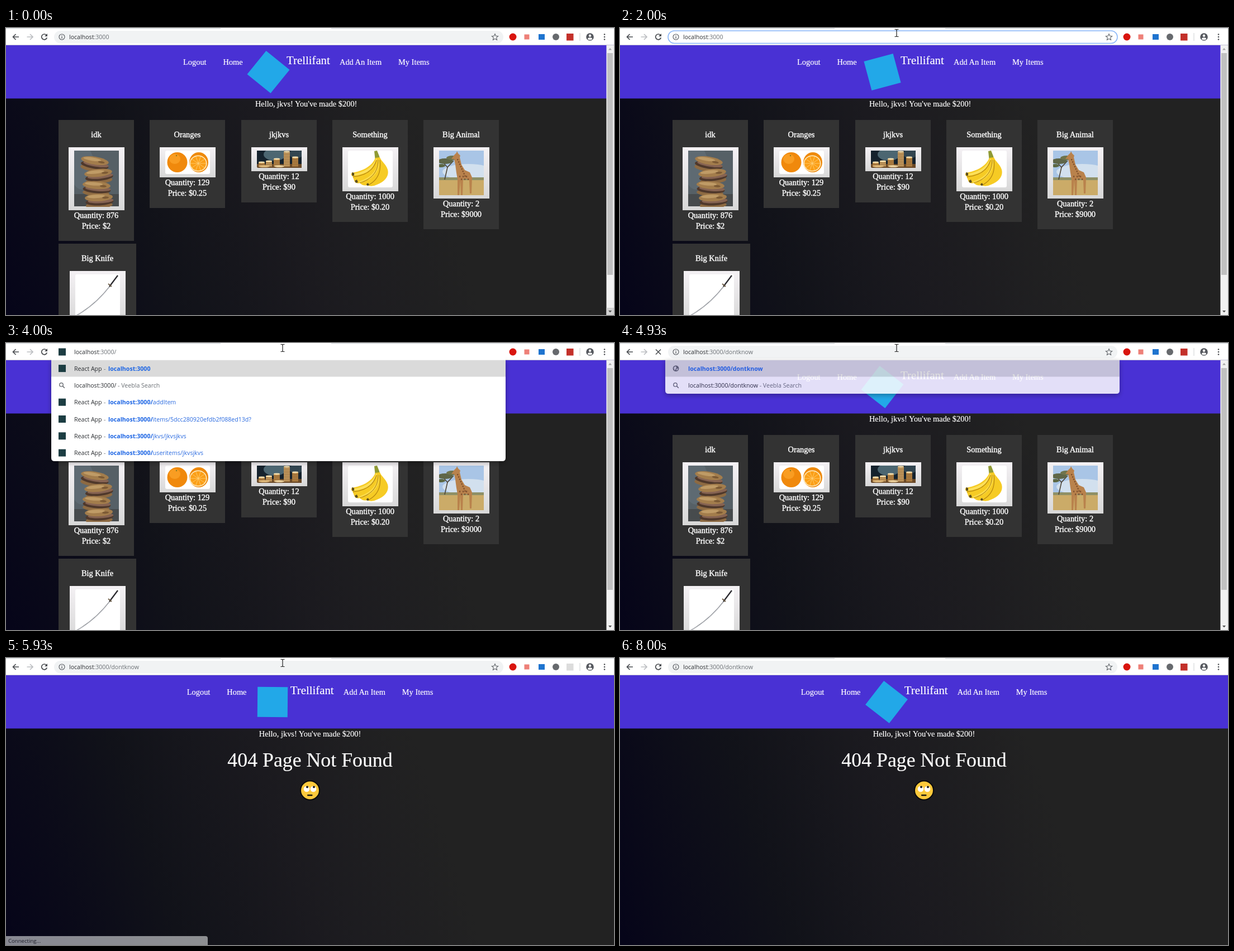
These frames come from a looping animation (1088x515 px, 8070 ms). An HTML page:

```html
<!DOCTYPE html>
<html lang="en">
<head>
<meta charset="utf-8">
<title>Item shop</title>
<style>
html, body { margin: 0; width: 100%; height: 100%; overflow: hidden; background: #fff; }
svg { display: block; width: 1088px; height: 515px; }
text { white-space: pre; }
.page text { font-family: "Liberation Serif", Times, serif; font-size: 14.4px; fill: #fff; stroke: #fff; stroke-width: .18px; }
.page .card text { stroke-width: .4px; }
.ui text, text.ui { font-family: "Open Sans", "Noto Sans", sans-serif; font-size: 10.6px; fill: #2b2e32; }
.ui .grey { fill: #6b7075; }
.ui .link { fill: #2b6be0; }
.ui .bold { fill: #1a64e4; font-weight: 700; }
.mid { text-anchor: middle; }
</style>
</head>
<body>
<svg id="stage" viewBox="0 0 1088 515" xmlns="http://www.w3.org/2000/svg"></svg>
<script>
const LOOP = 8070;
const stage = document.getElementById('stage');
const BRAND = 'Trellifant', USER = 'jkvs', ENGINE = 'Veebla';

const rect = (x, y, w, h, fill, more = '') =>
  `<rect x="${x}" y="${y}" width="${w}" height="${h}" fill="${fill}" ${more}/>`;
const disc = (x, y, r, fill, more = '') =>
  `<circle cx="${x}" cy="${y}" r="${r}" fill="${fill}" ${more}/>`;
const oval = (x, y, rx, ry, fill, more = '') =>
  `<ellipse cx="${x}" cy="${y}" rx="${rx}" ry="${ry}" fill="${fill}" ${more}/>`;
const path = (d, fill, more = '') => `<path d="${d}" fill="${fill}" ${more}/>`;
const line = (d, color, w = 1, more = '') =>
  path(d, 'none', `stroke="${color}" stroke-width="${w}" ${more}`);
const text = (x, y, s, more = '') => `<text x="${x}" y="${y}" ${more}>${s}</text>`;
const span = (s, cls) => `<tspan class="${cls}">${s}</tspan>`;
const group = (id, body, more = '') => `<g id="${id}" ${more}>${body}</g>`;
const repeat = (n, f) => Array.from({ length: n }, (_, i) => f(i)).join('');

// Pictures, each drawn from its own top left corner
function cookies() {
  return rect(0, 0, 80, 100, '#566066') + rect(0, 78, 80, 22, '#474b4d') +
    oval(14, 30, 22, 40, '#65727b', 'opacity=".6"') +
    repeat(4, i => {
      const x = 40 + [-3, 3, 0, 4][i], y = 18 + i * 22, tilt = [9, -6, 4, -3][i];
      return `<g transform="translate(${x} ${y}) rotate(${tilt})">` +
        oval(0, 14, 24, 6, '#8d6a42') + oval(1, 8, 25, 6.5, '#4f382b') +
        oval(3, 6, 23, 4.5, '#866352') + oval(0, 0, 25, 7, '#a37d4c') +
        oval(-5, -2, 16, 3, '#bf9b66') + oval(12, 1, 6, 2, '#7c5a35') + '</g>';
    });
}
function oranges() {
  return rect(0, 0, 80, 42, '#fff') + disc(21.5, 21, 18, '#f0890c') +
    oval(17, 15, 10, 9, '#f99d22') + disc(20, 9, 1.2, '#8a7a1c') +
    oval(60, 21, 17, 18, '#ee8a0d') + oval(59, 23, 15.5, 14.5, '#fff0c8') +
    oval(59, 23, 14, 13, '#fb9f17') +
    repeat(5, i => {
      const a = i * Math.PI / 5, x = 14 * Math.cos(a), y = 13 * Math.sin(a);
      return line(`M${59 - x} ${23 - y}L${59 + x} ${23 + y}`, '#ffd27c', .8);
    });
}
function coins() {
  return rect(0, 0, 80, 31, '#15222d') + oval(32, 7, 20, 11, '#5f7d88', 'opacity=".75"') +
    oval(70, 6, 12, 8, '#3f5560', 'opacity=".7"') + rect(0, 24, 80, 7, '#6b4a28') +
    [[3, 8], [16, 10], [30, 14], [48, 27], [63, 17]].map(([x, h], i) =>
      rect(x, 29 - h, 11, h, i % 2 ? '#d0a566' : '#b98746') +
      repeat(h / 3 | 0, k => line(`M${x} ${28 - k * 3}h11`, '#6d4926', .8)) +
      oval(x + 5.5, 29 - h, 5.5, 1.4, '#f5e0b0')).join('') +
    oval(13, 28, 10, 2, '#dcb678') + oval(40, 28, 9, 2, '#e8cc98');
}
function bananas() {
  return rect(0, 0, 80, 66, '#fff') +
    path('M47 1l5-1 4 10 2 8-9 2z', '#8f9a34') +
    path('M49 13C44 26 30 36 7 40q-3 3 1 6l4 10q4 4 9 2 6 6 13 4 8 4 18-1C67 55 74 45 71 34 68 24 60 20 57 12z', '#f6cb24') +
    path('M50 14C46 28 32 38 9 42l1 3C34 43 48 32 52 16z', '#fde05a') +
    path('M53 18C53 36 40 49 18 56l4 2C44 53 57 38 56 17z', '#fbdc4c') +
    line('M51 17C46 34 32 45 9 47M54 17C54 38 42 52 21 58M57 17C60 40 52 54 36 62', '#b98a10', 1.3) +
    path('M7 39l4 1v5l-4 0zM12 54l4-2 2 5-4 1zM33 60l3-2 2 4-4 1z', '#5f5020');
}
function giraffe() {
  return rect(0, 0, 80, 80, '#a9c5e6') + oval(52, 38, 46, 14, '#d2e0ee') +
    rect(0, 52, 80, 28, '#cbab68') + rect(0, 48, 80, 5, '#8f9066') +
    line('M10 52L15 30L26 18M15 30L6 20', '#4d4436', 1.6) +
    oval(11, 19, 14, 5, '#5f6648') + oval(24, 13, 11, 4, '#6f744d') + oval(4, 27, 7, 3, '#5c6743') +
    path('M27 8l4-4 1-3 2 4 4 4-1 3 3 13 6 10 9 4 4 9-1 29h-3l-1-24-7-3-4 1-1 29h-3l-1-27-2 27h-3l0-29-2-11-2-15-2-10-5 0z', '#b9824c') +
    repeat(8, i => rect(32 + i * 1.9, 15 + i * 4.2, 2.4, 2.4, '#80502c')) +
    repeat(6, i => rect(36 + i * 3, 45 + i % 2 * 5, 2.2, 3, '#845532'));
}
function knife() {
  return rect(0, 0, 80, 80, '#fff') +
    line('M2 74Q36 55 63 20', '#8f9298', 1.6) + line('M3 74Q36 56 63 21', '#d8dade', .8) +
    line('M61 22L76 2', '#2c2b30', 2.4) + line('M59 17L65 22', '#6b5b45', 2);
}

function card(x, y, w, h, title, art, ih, qty, price) {
  const c = x + w / 2, fx = Math.round(c - 50), fy = y + 49;
  return rect(x, y, w, h, '#333') +
    '<g class="card">' + text(c, y + 31, title, 'class="mid"') +
    text(c, fy + ih + 26, 'Quantity: ' + qty, 'class="mid"') +
    text(c, fy + ih + 45, 'Price: $' + price, 'class="mid"') + '</g>' +
    rect(fx, fy, 100, ih + 12, 'url(#mat)') +
    `<svg x="${fx + 10}" y="${fy + 6}" width="80" height="${ih}"><g clip-path="inset(0 round 3px)">${art}</g></svg>`;
}

// Header shared by both pages; dx is the shift without a scrollbar
function header(dx, id) {
  return rect(0, 31, 1088, 95.5, '#4931d4') + group(id, rect(-27, -27, 54, 54, '#22a8e8')) +
    text(317 + dx, 66, 'Logout') + text(388.5 + dx, 66, 'Home') +
    text(502 + dx, 65, BRAND, 'style="font-size:20.8px"') +
    text(597 + dx, 66, 'Add An Item') + text(702 + dx, 66, 'My Items') +
    text(537.2 + dx, 141, `Hello, ${USER}! You've made $200!`, 'class="mid"');
}

const shop = rect(0, 126, 1088, 389, 'url(#dusk)') + header(0, 'spinA') +
  card(94, 165, 135, 217, 'idk', cookies(), 101, 876, '2') +
  card(257, 165, 135, 158, 'Oranges', oranges(), 42, 129, '0.25') +
  card(421, 165, 135, 148, 'jk' + USER, coins(), 31, 12, '90') +
  card(584, 165, 135, 183, 'Something', bananas(), 67, 1000, '0.20') +
  card(747, 165, 135, 196, 'Big Animal', giraffe(), 80, 2, '9000') +
  card(94, 387, 139, 217, 'Big Knife', knife(), 80, 1, '40') +
  rect(1074.4, 31, 13.6, 484, '#f1f1f1') + rect(1076, 45, 10, 398, '#c1c1c1') +
  group('press', rect(1074.4, 502, 13.6, 13, '#d2d2d2')) +
  path('M1078 39.5l3-3.5 3 3.5z', '#a3a3a3') + path('M1078 507l3 3.5 3-3.5z', '#505050');

const face = disc(544, 237.5, 17, '#fdc93b', 'stroke="#0a0a0a" stroke-width="2"') +
  disc(538, 235, 5.3, '#fff') + disc(550, 235, 5.3, '#fff') +
  disc(539, 231.5, 2, '#1a1a1a') + disc(551, 231.5, 2, '#1a1a1a') +
  rect(539, 245, 9.5, 2.4, '#1d1a12', 'rx="1"');

const missing = rect(0, 126, 1088, 389, 'url(#dusk)') + header(6.8, 'spinB') +
  text(544, 195, '404 Page Not Found', 'class="mid" style="font-size:35.8px"') + face;

const glass = (x, y) => disc(x - 1, y - 1, 3.2, 'none', 'stroke="#5f6368" stroke-width="1.3"') +
  line(`M${x + 1.4} ${y + 1.4}l3.4 3.4`, '#5f6368', 1.5);
const globe = (x, y) => disc(x, y, 5.4, '#5f6368') +
  path(`M${x - 4} ${y - 1}l3-3 2 2-1 3-2 3zM${x + 1} ${y + 1}l3-1-1 3-2 1z`, '#cfcfd4');
const tile = y => rect(94, y - 6.5, 13, 13, '#1c3c42');

const rowY = i => 45.6 + i * 30.3;
const visit = (i, tail) => tile(rowY(i)) + text(122, rowY(i) + 4, 'React App') + text(175, rowY(i) + 4, '-', 'class="grey"') +
  text(183, rowY(i) + 4, span('localhost:3000' + (tail ? '/' : ''), 'bold') + span(tail, 'link'));
const search = id => glass(100, rowY(1)) +
  text(122, rowY(1) + 4, `<tspan id="${id}">localhost:3000/</tspan>` + span(` - ${ENGINE} Search`, 'grey'));

const panel = h => path(`M81 30V${h - 6}q0 6 6 6H888q6 0 6-6V30z`, '#fff') +
  rect(81, 30.5, 813, 30, '#dadada');

const longList = panel(212) + visit(0, '') + search('find') + visit(2, 'addItem') +
  visit(3, 'items/5dcc280920efdb2f088ed13d?') +
  visit(4, `${USER}/${USER}${USER}`) + visit(5, `useritems/${USER}${USER}`);
const shortList = panel(91) + globe(100, rowY(0)) +
  text(122, rowY(0) + 4, '', 'id="go" class="bold"') + search('findShort');

const toolbar = rect(0, 0, 1088, 30, '#fff') + rect(0, 0, 384, 1.5, '#dee1e6') +
  rect(582, 0, 506, 1.5, '#dee1e6') + rect(0, 30, 1088, 1, '#c4c1d6') +
  line('M23 16H12.5M17.5 11l-5 5 5 5', '#4a4d51', 1.7) +
  line('M37.5 16H48M43 11l5 5-5 5', '#bcbec1', 1.7) +
  group('reload', line('M72.2 12.6A4.9 4.9 0 1 0 73.3 17.2', '#4a4d51', 1.7) + path('M74 10v5h-5z', '#4a4d51')) +
  group('stop', line('M64 11.5l9 9M73 11.5l-9 9', '#4a4d51', 1.6)) +
  group('pill', rect(86, 5, 804, 22.5, '#f1f3f4', 'id="box" rx="11.25" stroke-width="1.5"') +
    disc(100, 16, 5, 'none', 'stroke="#5f6368" stroke-width="1.2"') +
    rect(99.4, 15, 1.3, 4, '#5f6368') + rect(99.4, 12.7, 1.3, 1.4, '#5f6368') +
    line('M875 10.6l1.6 3.7 4 .4-3 2.7.9 4-3.5-2.1-3.5 2.1.9-4-3-2.7 4-.4z', '#5f6368', 1.1)) +
  disc(907, 16, 6.5, '#d9150f') + rect(927.5, 11.5, 9, 9, '#ee8078') +
  rect(953, 11, 11, 10, '#1f74cf') + disc(984, 16, 6, '#66696d') +
  rect(1003, 10, 12.5, 12.5, '#c3302a', 'id="ext"') + rect(1026.5, 9, 1, 14, '#cfd1d4') +
  disc(1045, 16, 6.8, '#55585e') + disc(1045, 13.7, 2.2, '#fff') + oval(1045, 19.3, 3.9, 2, '#fff') +
  repeat(3, i => disc(1071, 11.5 + i * 4.5, 1.3, '#4a4d51'));

stage.innerHTML = `<defs>
  <linearGradient id="dusk" gradientUnits="userSpaceOnUse" x1="0" y1="480" x2="760" y2="230">
    <stop offset="0" stop-color="#060519"/><stop offset=".36" stop-color="#111219"/>
    <stop offset=".65" stop-color="#1b1a1f"/><stop offset="1" stop-color="#222"/></linearGradient>
  <linearGradient id="mat" x1="0" y1="0" x2="0" y2="1">
    <stop offset="0" stop-color="#f4f1f4"/><stop offset="1" stop-color="#d8d8d8"/></linearGradient>
  <filter id="shade" x="-5%" y="-20%" width="110%" height="150%">
    <feDropShadow dx="0" dy="3" stdDeviation="4" flood-opacity=".35"/></filter></defs>` +
  group('shop', shop, 'class="page"') + group('missing', missing, 'class="page"') +
  group('status', path('M0 499H357q4 0 4 4V515H0z', '#dfe1e3') +
    text(4, 511, 'Connecting...', 'style="font-size:9.6px"'), 'class="ui"') +
  group('bar', toolbar, 'class="ui"') +
  group('drop', group('long', longList) + group('short', shortList), 'class="ui" filter="url(#shade)"') +
  group('edit', path('M81 30.5V8q0-6 6-6H888q6 0 6 6V30.5z', '#fff') + tile(16)) +
  text(113, 20, '<tspan>localhost</tspan><tspan id="tail" class="grey"></tspan>', 'id="url" class="ui"') +
  rect(0, 7, 1, 15, '#222', 'id="caret"') +
  group('arrow', path('M0 0V13l3-2.8 2.2 5 2.3-1-2.2-4.9H9.5z', '#fff', 'stroke="#111" stroke-width=".9"')) +
  group('beam', line('M-3.5 -6.5h2.5l1 1 1-1h2.5M-3.5 6.5h2.5l1-1 1 1h2.5M0 -5.5V5.5', '#222', 1.2));

const el = {};
stage.querySelectorAll('[id]').forEach(n => el[n.id] = n);

const show = (n, on) => n.setAttribute('display', on ? 'inline' : 'none');
const place = (n, x, y, a = 0) => n.setAttribute('transform', `translate(${x} ${y}) rotate(${a})`);
const clamp = v => Math.max(0, Math.min(1, v));

const route = [[70, 1083, 512], [470, 770, 250], [870, 520, 38], [970, 495, 9], [5990, 495, 9],
  [6500, 420, 250], [6870, 348, 470], [7080, 285, 500], [7330, 193, 516]];
function pointer(t) {
  const i = route.findIndex(p => p[0] > t);
  if (i < 1) return null;
  const [t0, x0, y0] = route[i - 1], [t1, x1, y1] = route[i];
  const k = (t - t0) / (t1 - t0);
  return [x0 + (x1 - x0) * k, y0 + (y1 - y0) * k];
}

const WORD = 'dontknow';
const OPEN = 2400, TYPE = 4070, ENTER = 4870, LOADED = 5400;

function draw(t) {
  const loaded = t >= LOADED, open = t >= OPEN && t < ENTER;
  show(el.shop, !loaded);
  show(el.missing, loaded);
  place(el.spinA, 469.5, 79, t * .018 - 51);
  place(el.spinB, 477, 79, 270.5 + (t - 5930) * .018);
  show(el.press, t < 140);

  const busy = t >= ENTER && t < 5870;
  show(el.stop, busy);
  show(el.reload, !busy);
  el.ext.setAttribute('fill', loaded && t < 6300 ? '#dcdcdc' : '#c3302a');

  const focus = t >= 1270 && t < OPEN;
  el.box.setAttribute('fill', focus ? '#fff' : '#f1f3f4');
  el.box.setAttribute('stroke', focus ? '#86b4f8' : 'none');
  show(el.pill, !open);
  show(el.edit, open);

  const n = t < TYPE ? 0 : Math.min(8, 1 + Math.floor((t - TYPE) / 85));
  const tail = ':3000' + (t < OPEN ? '' : '/' + WORD.slice(0, n));
  el.tail.textContent = tail;
  el.url.setAttribute('x', open ? 122 : 113);
  el.go.textContent = el.findShort.textContent = 'localhost' + tail;

  const fade = t < ENTER ? 1 : clamp(1 - (t - 4890) / 260);
  show(el.drop, t >= OPEN && fade > 0);
  el.drop.setAttribute('opacity', fade);
  show(el.long, n === 0);
  show(el.short, n > 0);

  const blink = t < 2930 || t >= 3470 && t < 4000 || t >= TYPE;
  show(el.caret, open && blink);
  if (open) el.caret.setAttribute('x', Math.round(122 + el.url.getComputedTextLength()));

  show(el.status, t >= 5450 && t < 6080);
  el.status.setAttribute('opacity', .6 * clamp((6080 - t) / 150));

  const p = pointer(t), beam = p && p[1] < 30;
  show(el.beam, beam);
  show(el.arrow, p && !beam);
  if (p) place(beam ? el.beam : el.arrow, p[0], p[1]);
}

let start;
function tick(now) {
  start ??= now;
  draw((now - start) % LOOP);
  requestAnimationFrame(tick);
}
draw(0);
requestAnimationFrame(tick);
</script>
</body>
</html>
```
